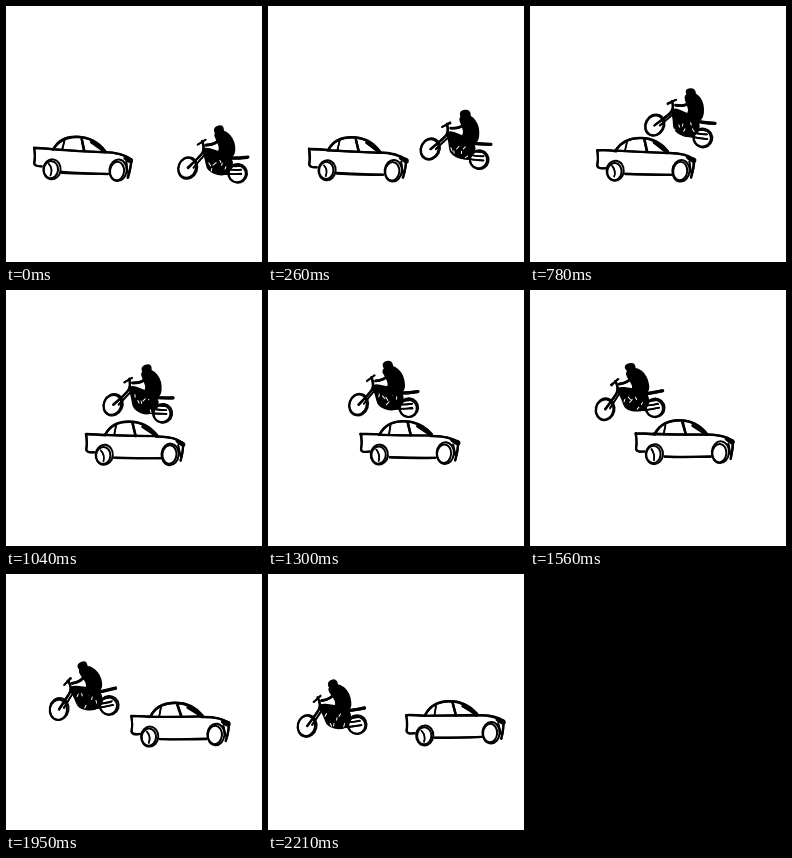
Animation, 256 px wide and 256 px high, one loop 2.34 s. Source, as an HTML page with a canvas:

```html
<!DOCTYPE html>
<html lang="en">
<head>
<meta charset="utf-8">
<title>Car and motorbike</title>
<style>
html, body { margin: 0; width: 100%; height: 100%; overflow: hidden; background: #fff; }
canvas { display: block; width: 256px; height: 256px; }
</style>
</head>
<body>
<canvas id="stage"></canvas>
<script>
const STEP = 130, STEPS = 18, LAST = STEPS - 1;
const canvas = document.getElementById('stage');
const ctx = canvas.getContext('2d');
const ratio = window.devicePixelRatio || 1;
canvas.width = canvas.height = 256 * ratio;

let seed = 1;
function random() {
  seed = (seed * 16807) % 2147483647;
  return seed / 2147483647;
}
const shake = amount => (random() - 0.5) * 2 * amount;

// Soft curve guided by a few shaky points.
function trace(points, wobble, closed) {
  const p = points.map(([x, y]) => [x + shake(wobble), y + shake(wobble)]);
  const middle = (a, b) => [(a[0] + b[0]) / 2, (a[1] + b[1]) / 2];
  const n = p.length;
  ctx.beginPath();
  if (closed) {
    ctx.moveTo(...middle(p[n - 1], p[0]));
    p.forEach((q, i) => ctx.quadraticCurveTo(...q, ...middle(q, p[(i + 1) % n])));
    ctx.closePath();
    return;
  }
  ctx.moveTo(...p[0]);
  for (let i = 1; i < n - 1; i++) {
    ctx.quadraticCurveTo(...p[i], ...(i < n - 2 ? middle(p[i], p[i + 1]) : p[n - 1]));
  }
  if (n === 2) ctx.lineTo(...p[1]);
}

// Each pen line is gone over twice, so its weight varies.
function line(points, width = 2) {
  ctx.lineWidth = width;
  for (let pass = 0; pass < 2; pass++) {
    trace(points, 0.5);
    ctx.stroke();
  }
}

function blob(points) {
  trace(points, 0.7, true);
  ctx.lineWidth = 1.5;
  ctx.fill();
  ctx.stroke();
}

// Two rings pushed apart leave a heavier lower left side.
function wheel(x, y, rx, ry, turn, heavy) {
  ctx.lineWidth = 2;
  for (const k of [0, heavy]) {
    ctx.beginPath();
    ctx.ellipse(x - k * 0.4 + shake(0.3), y + k * 0.2 + shake(0.3),
      rx - k * 0.6, ry - k * 0.6, turn, 0, Math.PI * 2);
    ctx.stroke();
  }
}

function drawCar() {
  // shell
  line([[-10, -3], [-19, -2], [-17, -12], [-18, -21]], 2.1);
  line([[-18, -21], [-8, -21], [1, -20]], 2.2);
  line([[1, -20], [8, -33], [42, -33], [53, -19]], 2.4);
  line([[0, -20], [26, -19], [53, -18]], 2.1);
  line([[52, -18], [70, -18], [79, -11]], 2.2);
  line([[10, 3], [30, 4], [56, 4]], 2.2);
  // windows
  line([[12, -29], [10, -20]], 1.6);
  line([[29, -31], [32, -19]], 2.4);
  line([[39, -28], [50, -20]], 2.6);
  // nose
  blob([[70, -14], [81, -12], [80, -7], [76, -9]]);
  line([[79, -11], [79, -3], [76, 7]], 2.2);
  line([[74, -9], [76, 2]], 1.6);

  wheel(0, 0, 8.6, 10, 0.1, 2.4);
  line([[-3, -5], [1, 0], [-1, 6]], 1.5);
  wheel(66, 0, 8.6, 10.8, 0.1, 2.6);
}

function drawRider() {
  blob([[21, -37], [32, -42], [43, -32], [45, -14], [25, -11], [30, -22], [26, -29]]);
  line([[28, -32], [25, -26], [15, -25]], 2.6);
  // helmet
  blob([[21, -43], [30, -46], [32, -37], [24, -36]]);
}

function drawBike() {
  wheel(0, 0, 9.4, 11, 0.25, 1.4);
  wheel(50, 0, 9.4, 9.4, 0, 1.4);
  // fork and handlebar
  line([[0, 0], [8, -10], [15, -20], [11, -28]], 2.2);
  line([[5, -1], [17, -18]], 1.6);
  line([[7, -24], [14, -30]], 1.8);
  // engine and frame
  blob([[11, -22], [28, -20], [44, -14], [43, -1], [34, 4], [20, 1], [17, -10]]);
  line([[30, -14], [45, -14], [58, -17]], 3);
  for (let i = 0; i < 3; i++) line([[32, 2 - i * 5], [44, 2 - i * 4], [54 - i, -i * 4]], 1.7);
  // gaps of paper between the parts
  ctx.strokeStyle = '#fff';
  ctx.lineWidth = 1;
  for (let i = 0; i < 6; i++) {
    const x = 20 + i * 3.5, y = -8 + shake(7), run = shake(2.5);
    trace([[x, y], [x + run, y + 2.5]], 0.4);
    ctx.stroke();
  }
  ctx.strokeStyle = '#000';
  drawRider();
}

function place(x, y, degrees, draw) {
  ctx.save();
  ctx.translate(x, y);
  ctx.rotate(degrees * Math.PI / 180);
  draw();
  ctx.restore();
}

function render(t) {
  seed = 7919 * (t + 1);
  ctx.setTransform(ratio, 0, 0, ratio, 0, 0);
  ctx.fillStyle = '#fff';
  ctx.fillRect(0, 0, 256, 256);
  ctx.fillStyle = ctx.strokeStyle = '#000';
  ctx.lineCap = ctx.lineJoin = 'round';

  // The car rolls right; the bike jumps over it to the left.
  place(46 + 6.53 * t, 165 - ((t - 7) / 5.3) ** 2, 0.9 - 0.2 * t, drawCar);
  const jumpX = 182 - 143 * t / LAST - 7.5 * Math.sin(Math.PI * t / LAST);
  const jumpY = 114 + 0.59 * (t - 9) ** 2;
  const pitch = 5.5 + 10 * Math.sin(2 * Math.PI * (t + 0.3) / 19.5);
  place(jumpX, jumpY, pitch, drawBike);
}

const start = performance.now();
let shown = -1;
function tick() {
  const step = Math.floor((performance.now() - start) / STEP) % STEPS;
  if (step !== shown) render(shown = step);
  requestAnimationFrame(tick);
}
tick();
</script>
</body>
</html>
```
